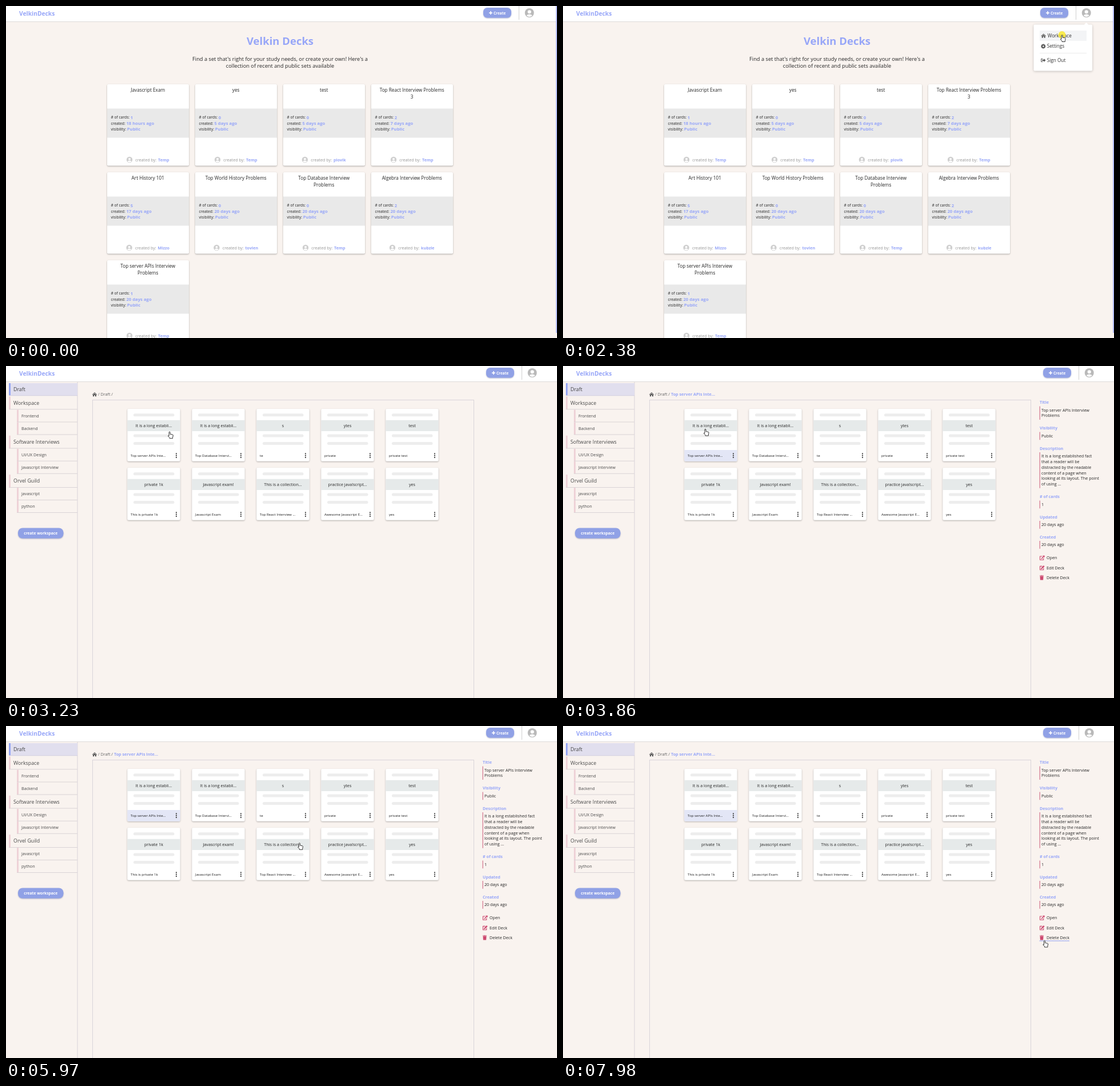
These frames come from a looping animation (964 by 581 pixels, 8 s). An HTML page with a canvas:

```html
<!DOCTYPE html>
<html lang="en">
<head>
<meta charset="utf-8">
<title>Study decks</title>
<style>
html, body { margin: 0; width: 100%; height: 100%; overflow: hidden; background: #f9f3ef; }
canvas { display: block; }
</style>
</head>
<body>
<canvas id="stage" width="964" height="581"></canvas>
<script>
const ctx = document.getElementById('stage').getContext('2d');
const LOOP = 8000, REM = 10.28;
const BLUE = '#97a6f8', BUTTON = '#90a1e6', INK = '#262626', PINK = '#cd4a70', PAPER = '#f9f3ef';

// ---------- drawing helpers ----------
function rect(x, y, w, h, color, radius = 0) {
  ctx.fillStyle = color;
  ctx.beginPath();
  ctx.roundRect(x, y, w, h, radius);
  ctx.fill();
}

function disc(x, y, r, color) {
  ctx.fillStyle = color;
  ctx.beginPath();
  ctx.arc(x, y, r, 0, 7);
  ctx.fill();
}

function shadowed(blur, offset, color, draw) {
  ctx.save();
  ctx.shadowBlur = blur;
  ctx.shadowOffsetY = offset;
  ctx.shadowColor = color;
  draw();
  ctx.restore();
}

// Text is placed by the middle of its capitals; returns its width.
function text(str, x, midY, rem, color = INK, weight = 400, align = 'left') {
  const size = rem * REM;
  ctx.font = `${weight} ${size}px "Open Sans", sans-serif`;
  ctx.textAlign = align;
  ctx.fillStyle = color;
  ctx.fillText(str, x, midY + size * 0.36);
  return ctx.measureText(str).width;
}

function widthOf(str, rem, weight = 400) {
  ctx.font = `${weight} ${rem * REM}px "Open Sans", sans-serif`;
  return ctx.measureText(str).width;
}

function shape(path, x, y, fill, stroke, line = 1) {
  ctx.save();
  ctx.translate(x, y);
  if (fill) { ctx.fillStyle = fill; ctx.fill(path, 'evenodd'); }
  if (stroke) {
    ctx.strokeStyle = stroke;
    ctx.lineWidth = line;
    ctx.lineJoin = 'round';
    ctx.stroke(path);
  }
  ctx.restore();
}

// ---------- icons ----------
const house = new Path2D('M-4.3 .3L0-3.6 4.3 .3 3.7 1 0-2.3-3.7 1ZM-3 1L0-1.6 3 1V3.7H.9V1.3H-.9V3.7H-3Z');
const exitFrame = new Path2D('M-.9-2.6H-3.6V2.6H-.9');
const exitArrow = new Path2D('M-2-.9H.9V-2.9L4.2 0 .9 2.9V.9H-2Z');
const trash = new Path2D('M-3.5-3.8H-1.2L-.7-4.4H.7L1.2-3.8H3.5V-2.8H-3.5ZM-3-2.3H3L2.6 4.2H-2.6Z');
const box = new Path2D('M.5-2.7H-3.5V3.6H2.7V.5');
const openArrow = new Path2D('M1-4H4.6V-.4L3.4-1.6-.6 2.4-1.6 1.4 2.2-2.6Z');
const pen = new Path2D('M2.8-4.2L4.6-2.4-.2 2.2-2 2.5-1.7 .6Z');
const arrow = new Path2D('M0 0V8.6L2 6.8 3.5 10 4.9 9.4 3.5 6.4H6Z');
const hand = new Path2D('M-1 1Q0-.6 1 1V4.6L5 5.3Q6.2 5.6 6.1 7L5.4 10V12H0V10.7L-2.6 8Q-2.8 6.5-1 7.5Z');

function gear(x, y, color) {
  ctx.save();
  ctx.translate(x, y);
  for (let i = 0; i < 4; i++) {
    rect(-1, -4, 2, 8, color);
    ctx.rotate(Math.PI / 4);
  }
  ctx.restore();
  disc(x, y, 3, color);
  disc(x, y, 1.3, '#fff');
}

function avatar(x, y, r, color) {
  disc(x, y, r, color);
  ctx.save();
  ctx.beginPath();
  ctx.arc(x, y, r * 0.86, 0, 7);
  ctx.clip();
  disc(x, y - r * 0.22, r * 0.38, '#fff');
  ctx.fillStyle = '#fff';
  ctx.beginPath();
  ctx.ellipse(x, y + r * 0.82, r * 0.68, r * 0.52, 0, 0, 7);
  ctx.fill();
  ctx.restore();
}

// ---------- shared parts ----------
function header(dx) {
  rect(0, 0, 964, 27, '#fff');
  rect(0, 27, 964, 1, '#dddad9');
  text('VelkinDecks', 23, 13, 1, BLUE, 700);
  shadowed(2, 1, 'rgba(80,90,150,.45)', () => rect(835 + dx, 3, 49, 17.5, BUTTON, 7));
  rect(845 + dx, 11.3, 6, 1.6, '#fff');
  rect(847.2 + dx, 9.1, 1.6, 6, '#fff');
  text('Create', 853 + dx, 12.3, 0.63, '#fff', 700);
  rect(897 + dx, 0, 1, 24, '#d0d0d0');
  avatar(915.7 + dx, 12, 8, '#b9b9b9');
}

function menu(dx) {
  shadowed(4, 1, 'rgba(0,0,0,.22)', () => rect(823.5 + dx, 32.5, 102.5, 81, '#fff', 2));
  shape(new Path2D('M-4 4L0 0 4 4Z'), 915.5 + dx, 29, '#fff');
  rect(834 + dx, 43, 82, 18, '#f3f4f6');
  rect(834 + dx, 82, 82, 1, '#ececec');
  const gray = '#555';
  shape(house, 840.7 + dx, 52, gray);
  gear(840.3 + dx, 70.5, gray);
  shape(exitFrame, 840.3 + dx, 95, null, gray, 1);
  shape(exitArrow, 840.3 + dx, 95, gray);
  text('Workspace', 847.7 + dx, 52, 0.8, '#333');
  text('Settings', 846.7 + dx, 70.5, 0.8, '#333');
  text('Sign Out', 846.7 + dx, 95, 0.8, '#333');
}

// ---------- gallery page ----------
const decks = [
  ['Javascript Exam', 1, '18 hours', 'Temp'],
  ['yes', 0, '5 days', 'Temp'],
  ['test', 0, '5 days', 'plovik'],
  ['Top React Interview Problems|3', 2, '7 days', 'Temp'],
  ['Art History 101', 5, '17 days', 'Mizzo'],
  ['Top World History Problems', 0, '20 days', 'tovlen'],
  ['Top Database Interview|Problems', 0, '20 days', 'Temp'],
  ['Algebra Interview Problems', 2, '20 days', 'kubzle'],
  ['Top server APIs Interview|Problems', 1, '20 days', 'Temp'],
];

function deckCard([title, count, age, owner], i) {
  const x = 177 + 154 * (i % 4), y = 137 + 154 * Math.floor(i / 4), mid = x + 71.2;
  shadowed(2.5, 1, 'rgba(0,0,0,.32)', () => rect(x, y, 143, 142.5, '#fff', 2));
  rect(x, y + 42.5, 143, 51, '#e9e9e9');
  title.split('|').forEach((line, n) => text(line, mid, y + 10.4 + n * 11.3, 0.8, INK, 400, 'center'));
  [['# of cards:', count], ['created:', age + ' ago'], ['visibility:', 'Public']].forEach(([label, value], n) => {
    const rowY = y + 58 + n * 10.3;
    const w = text(label, x + 6.5, rowY, 0.65);
    text(value, x + 8.2 + w, rowY, 0.75, BLUE, 700);
  });
  const labelW = widthOf('created by:', 0.7), total = 15.5 + labelW + 2.8 + widthOf(owner, 0.7, 700);
  const left = mid - total / 2;
  avatar(left + 5.2, y + 132, 5.2, '#cfcfcf');
  text('created by:', left + 15.5, y + 132.3, 0.7, '#969696');
  text(owner, left + 18.3 + labelW, y + 132.3, 0.7, BLUE, 700);
}

function galleryPage(menuOpen) {
  header(0);
  text('Velkin Decks', 479.5, 61.5, 1.8, BLUE, 700, 'center');
  text("Find a set that's right for your study needs, or create your own! Here's a", 479.5, 92.7, 0.9, INK, 400, 'center');
  text('collection of recent and public sets available', 479.5, 104.9, 0.9, INK, 400, 'center');
  decks.forEach(deckCard);
  rect(962, 0, 2, 572, '#b4bcf3');
  if (menuOpen) menu(0);
}

// ---------- workspace page ----------
const folders = [
  ['Workspace', 'Frontend', 'Backend'],
  ['Software Interviews', 'UI/UX Design', 'Javascript Interview'],
  ['Orvel Guild', 'javascript', 'python'],
];
const tiles = [
  ['It is a long establi...', 'Top server APIs Inte...'],
  ['It is a long establi...', 'Top Database Intervi...'],
  ['s', 'te'],
  ['ytes', 'private'],
  ['test', 'private test'],
  ['private 1k', 'This is private 1k'],
  ['Javascript exam!', 'Javascript Exam'],
  ['This is a collection...', 'Top React Interview ...'],
  ['practice java!script...', 'Awesome Javascript E...'],
  ['yes', 'yes'],
];
const details = [
  [63.5, 'Title', 'Top server APIs Interview', 'Problems'],
  [108.5, 'Visibility', 'Public'],
  [144, 'Description', 'It is a long established fact', 'that a reader will be', 'distracted by the readable',
    'content of a page when', 'looking at its layout. The point', 'of using ...'],
  [228.5, '# of cards', '1'],
  [264, 'Updated', '20 days ago'],
  [299, 'Created', '20 days ago'],
];
const actions = ['Open', 'Edit Deck', 'Delete Deck'];

function sidebar() {
  rect(124.5, 28, 1, 553, '#d9d4da');
  rect(5, 30, 120, 21.5, '#e1dfee');
  rect(5, 30, 3, 21.5, '#94a5f3');
  rect(5, 51.3, 120, 1, '#cfcde0');
  text('Draft', 13, 41, 0.86, '#444');
  folders.forEach(([name, ...children], i) => {
    const y = 53.5 + i * 68.3;
    sideRow(name, 5, y, 22.3, 0.86);
    children.forEach((child, n) => sideRow(child, 19, y + 23 + n * 22, 21.5, 0.7));
  });
  shadowed(2, 1, 'rgba(80,90,150,.45)', () => rect(21, 283.5, 79.5, 18, BUTTON, 8));
  text('create workspace', 60.7, 292.8, 0.65, '#fff', 700, 'center');
}

function sideRow(name, x, y, h, rem) {
  rect(x, y, 3, h, '#eed2d7');
  rect(x, y + h - 0.5, 125 - x, 1, '#d9d3d6');
  text(name, x + 8, y + h / 2, rem, '#4a4a4a');
}

function tile([caption, name], i, selected) {
  const x = 212.3 + 113 * (i % 5), y = 75 + 103 * Math.floor(i / 5);
  shadowed(2.5, 1, 'rgba(0,0,0,.3)', () => rect(x, y, 92.4, 91.7, '#fff', 2));
  rect(x, y + 19.7, 92.4, 19.3, '#e6eaea');
  for (const dy of [8.3, 44.5, 58]) rect(x + 10.7, y + dy, 71.5, 5, '#ededed', 2.5);
  if (selected) rect(x, y + 72, 92.4, 19.7, '#e3e6f6', [0, 0, 2, 2]);
  text(caption, x + 46.2, y + 29.6, 0.7, INK, 400, 'center');
  text(name, x + 5.7, y + 82, 0.6, '#1c1c1c');
  for (const dy of [78.4, 81.7, 85]) disc(x + 85.7, y + dy, 1.15, '#484848');
}

function detailPanel(hovered) {
  for (const [y, label, ...lines] of details) {
    text(label, 834, y, 0.7, BLUE, 700);
    rect(833.6, y + 7, 1.2, 4 + lines.length * 9.8, '#d2728c');
    lines.forEach((line, n) => text(line, 837, y + 13.5 + n * 9.85, 0.7));
  }
  actions.forEach((label, i) => {
    const y = 335.7 + i * 17.4;
    if (i === 2) shape(trash, 837.5, y - 0.2, PINK);
    else {
      shape(box, 838, y, null, PINK, 1.1);
      shape(i ? pen : openArrow, 838, y, PINK);
    }
    const w = text(label, 846, y, 0.7);
    if (i === hovered) rect(833.5, y + 5.1, 12.5 + w, 1, '#8b9cf0');
  });
}

function workspacePage(t) {
  const selected = t >= 3860;
  header(5);
  sidebar();
  shape(house, 155, 49.6, '#555');
  text('/ Draft /', 161, 49.7, 0.7, '#666');
  if (selected) text('Top server APIs Inte...', 189, 49.7, 0.7, BLUE, 700);
  ctx.strokeStyle = '#d9d4da';
  ctx.lineWidth = 1;
  ctx.strokeRect(151.5, 59.5, 667, 540);
  tiles.forEach((data, i) => tile(data, i, selected && i === 0));
  if (selected) detailPanel(t < 6560 ? -1 : t < 7175 ? 0 : t < 7890 ? 1 : 2);
  else if (t < 2680) menu(5);
}

// ---------- pointer ----------
// Start, end and number of steps of each burst of movement.
const bursts = [
  [70, 830, 11], [910, 1680, 11], [1750], [2380], [2530, 3310, 11], [3390], [3860], [4160, 4930, 11],
  [5020, 5800, 11], [5870, 6650, 11], [6730], [7030, 7260, 4], [7430, 7510, 2], [7810, 7980, 3],
];
// Time and position of the pointer tip.
const track = [
  [70, 893, 574], [260, 640, 480], [420, 513, 350], [620, 610, 220], [830, 766, 131],
  [910, 780, 122], [1290, 906, 22], [1380, 913, 18], [1450, 908, 24], [1680, 874, 51], [1750, 873, 50.5],
  [2380, 873, 50.5], [2620, 869.5, 52], [2900, 620, 80], [3140, 330, 112], [3310, 249, 117], [3390, 249, 110],
  [4090, 249, 110], [4320, 430, 69], [4620, 840, 150], [4930, 860, 312], [5020, 832, 322],
  [5176, 748, 333], [5400, 540, 356], [5580, 421, 300], [5800, 470, 231], [5870, 474, 215],
  [6060, 570, 189], [6400, 800, 270], [6650, 858, 334], [6730, 855.5, 332],
  [6960, 855.5, 332], [7260, 861, 350], [7430, 860.5, 349], [7510, 859.5, 350], [7740, 859.5, 350], [7980, 842.5, 375],
];

function stepTime(t) {
  const burst = bursts.findLast(b => b[0] <= t);
  if (!burst) return 0;
  const [start, end = start, steps = 1] = burst;
  if (steps === 1) return start;
  const gap = (end - start) / (steps - 1);
  return start + gap * Math.min(steps - 1, Math.floor((t - start) / gap + 0.15));
}

function pointerAt(t) {
  const i = track.findLastIndex(p => p[0] <= t);
  if (i < 0) return null;
  const a = track[i], b = track[i + 1] || a;
  const f = b === a ? 0 : (t - a[0]) / (b[0] - a[0]);
  return [a[1] + (b[1] - a[1]) * f, a[2] + (b[2] - a[2]) * f];
}

function overGrid(x, y, left, top, pitchX, pitchY, size, columns, rows) {
  const dx = x - left, dy = y - top;
  return dx >= 0 && dy >= 0 && dx < pitchX * columns && dy < pitchY * rows && dx % pitchX < size && dy % pitchY < size;
}

function isLink(x, y, t) {
  if (t < 2600) return overGrid(x, y, 177, 137, 154, 154, 143, 4, 2) || (x > 834 && y < 62);
  if (t < 2680) return true;
  return overGrid(x, y, 212, 75, 113, 103, 92, 5, 2) || (x > 833 && x < 887 && y > 329);
}

function pointer(t, now) {
  const pos = pointerAt(t);
  if (!pos) return;
  const [x, y] = pos;
  const clicking = (now >= 2380 && now < 2530) || (now >= 3390 && now < 3860);
  if (clicking) disc(x, y, 6.5, 'rgba(250,232,40,.8)');
  shape(isLink(x, y, t) ? hand : arrow, x, y, '#fff', '#222', 0.9);
}

// ---------- loop ----------
function draw(now) {
  const t = stepTime(now);
  rect(0, 0, 964, 581, PAPER);
  if (t < 2600) galleryPage(t >= 1430);
  else workspacePage(t);
  pointer(t, now);
}

function tick() {
  draw(performance.now() % LOOP);
  requestAnimationFrame(tick);
}
tick();
</script>
</body>
</html>
```
